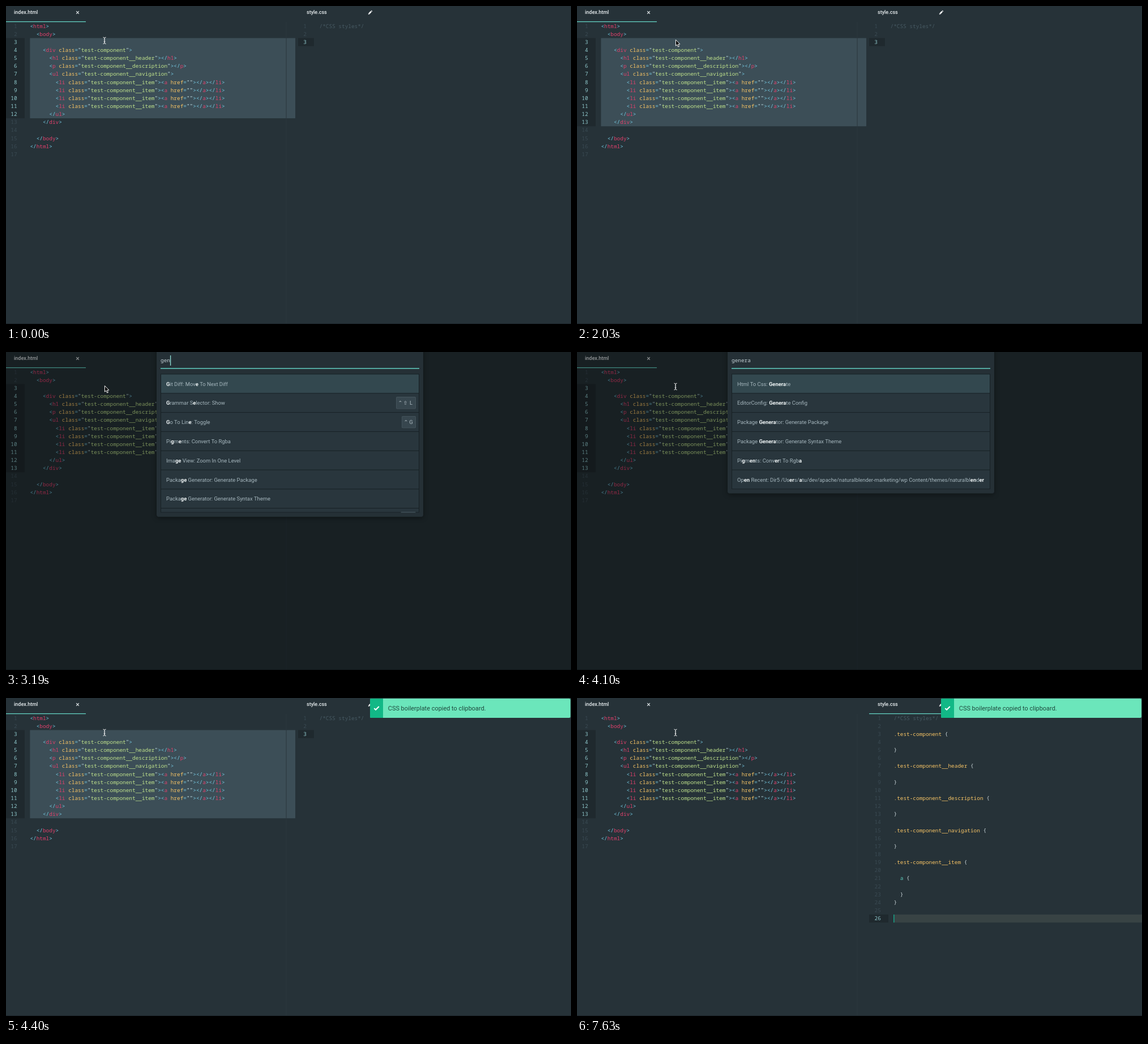
Write an HTML page with a canvas that moves like this. It is 998 px wide and 561 px high and loops after 8 s.

```html
<!DOCTYPE html>
<html lang="en">
<head>
<meta charset="utf-8">
<title>Editor command palette</title>
<style>
html, body { margin: 0; width: 100%; height: 100%; overflow: hidden; background: #263238; }
canvas { display: block; }
</style>
</head>
<body>
<canvas id="stage" width="998" height="561"></canvas>
<script>
const ctx = document.getElementById('stage').getContext('2d');
const LOOP = 8000, TOP = 28.3, LINE = 14.147, ROW = 33.8;
const MONO = '9.41px "Noto Sans Mono", monospace';
const UI = '9.41px Roboto, sans-serif';
const SYMBOL = '9.41px Roboto, "DejaVu Sans", sans-serif';
const C = {
  bg: '#263238', gutter: '#1f292e', select: '#3c4e57', guide: '#2a373d', dim: '#3a4a53', live: '#8fc7cb',
  punct: '#76c9e2', tag: '#e0416c', attr: '#f7c465', str: '#c0e38c', quote: '#c3e2e8',
  comment: '#475a63', brace: '#c9d4d8', elem: '#5fd0c0', accent: '#62cfc0', caret: '#14a085'
};

const item = '      <li class="test-component__item"><a href=""></a></li>';
const html = [
  '<html>', '  <body>', '', '  <div class="test-component">'.padStart(32),
  '      <h1 class="test-component__header"></h1>',
  '      <p class="test-component__description"></p>',
  '      <ul class="test-component__navigation">',
  ...Array(4).fill('  ' + item),
  '      </ul>', '    </div>', '', '  </body>', '</html>', ''
];
const block = name => ['.test-component' + name + ' {', '', '}', ''];
const cssBefore = ['/*CSS styles*/', '', ''];
const cssAfter = [
  '/*CSS styles*/', '', ...['', '__header', '__description', '__navigation'].flatMap(block),
  '.test-component__item {', '', '  a {', '', '  }', '}', '', ''
];

const startList = [
  'About: View Release Notes', 'Activate Power Mode: Toggle|⌃⌥O', 'Application: About',
  'Application: Add Project Folder|⇧⌘O', 'Application: Bring All Windows To Front',
  'Application: Hide|⌘H', 'Application: Hide Other Applications|⌥⌘H', ''
];
// Asterisks force the emphasised runs.
const commands = [
  'Html To Css: Generate', 'EditorConfig: Generate Config',
  'Package Generator: Generate Package', 'Package Generator: Generate Syntax Theme',
  'Pigments: Convert To Rgba',
  'Op*en* Recent: Dir5 /Us*er*s/*a*tu/dev/apache/naturalblender-marketing/wp Content/themes/naturalbl*en*d*er*',
  'Git Diff: Move To Next Diff', 'Image View: Zoom In One Level', 'Settings View: Open|⌘,',
  'Grammar Selector: Show|⌃⇧L', 'Go To Line: Toggle|⌃G'
];
const QUERY = 'genera';
const typeTimes = [2890, 3040, 3190, 3360, 3510, 3660];
const listTimes = [3040, 3190, 3360, 3510, 3660, 3810];
const passed = (times, t) => times.filter(v => t >= v).length;

function rect(x, y, x2, y2, color) {
  ctx.fillStyle = color;
  ctx.fillRect(x, y, x2 - x, y2 - y);
}

function box(x, y, x2, y2, r, color) {
  ctx.beginPath();
  ctx.roundRect(x, y, x2 - x, y2 - y, r);
  ctx.fillStyle = color;
  ctx.fill();
}

function text(s, x, y, color, font, align = 'left') {
  ctx.font = font;
  ctx.fillStyle = color;
  ctx.textAlign = align;
  ctx.fillText(s, x, y);
  return ctx.measureText(s).width;
}

function path(points, color, width, fill) {
  ctx.beginPath();
  for (const [x, y] of points) ctx.lineTo(x, y);
  if (fill) {
    ctx.closePath();
    ctx.fillStyle = fill;
    ctx.fill();
  }
  ctx.strokeStyle = color;
  ctx.lineWidth = width;
  ctx.stroke();
}

const lineTop = n => TOP + LINE * (n - 1);

function htmlTokens(line) {
  let last = '';
  return line.match(/"[^"]*"|<\/?|[\w-]+|\s+|./g)?.flatMap(s => {
    const prev = last;
    last = s;
    if (s[0] === '"') return [['"', C.quote], [s.slice(1, -1), C.str], ['"', C.quote]];
    if (/\w/.test(s)) return [[s, prev[0] === '<' ? C.tag : C.attr]];
    return [[s, C.punct]];
  }) || [];
}

function cssTokens(line) {
  if (line.startsWith('/*')) return [[line, C.comment]];
  return (line.match(/[.\w-]+|\s+|./g) || []).map(s =>
    [s, s[0] === '.' ? C.attr : /\w/.test(s) ? C.elem : C.brace]);
}

function drawCode(lines, tokens, x, numX, from, to) {
  lines.forEach((line, i) => {
    const y = lineTop(i + 1) + 10.2, live = i + 1 >= from && i + 1 <= to;
    text(i + 1, numX, y, live ? C.live : C.dim, MONO, 'right');
    let at = x;
    for (const [s, color] of tokens(line)) at += text(s, at, y, color, MONO);
  });
}

function drawEditor(t) {
  const last = t < 450 ? 12 : 13, bottom = lineTop(last + 1);
  const selected = t < 2360 || (t >= 4250 && t < 5990);
  const focus = t >= 5990, pasted = t >= 6730;

  rect(0, 0, 998, 561, C.bg);
  rect(0, lineTop(3), 33, bottom, C.gutter);
  if (selected) rect(42.4, lineTop(3), 511, bottom, C.select);
  rect(494.5, 28, 495.5, 560, C.guide);

  const css = pasted ? cssAfter : cssBefore, n = css.length, shift = pasted ? 6 : 0;
  rect(516, lineTop(n), 544 + shift, lineTop(n + 1), C.gutter);
  if (focus) rect(553 + shift, lineTop(n), 998, lineTop(n + 1), '#384344');
  const caret = (focus && t < 6280) || (pasted && t < 7330) || t >= 7630;
  if (caret) rect(553 + shift, lineTop(n), 554.5 + shift, lineTop(n + 1), C.caret);

  drawCode(html, htmlTokens, 42.4, 19.6, 3, last);
  drawCode(css, cssTokens, 553.5 + shift, 530.8 + shift, n, n);

  const tabFont = '500 9px Roboto, sans-serif';
  text('index.html', 14, 14.3, '#e8eef0', tabFont);
  text('style.css', 531, 14.3, '#e8eef0', tabFont);
  path([[124.2, 9.2], [128.8, 13.8]], '#e8eef0', 1.2);
  path([[128.8, 9.2], [124.2, 13.8]], '#e8eef0', 1.2);
  path([[641.4, 13.3], [645, 9.7]], '#fff', 2.5);
  path([[645.6, 9.1], [646.4, 8.3]], '#fff', 2.5);
  path([[640, 14.8], [640.4, 12.9], [641.9, 14.4]], '#fff', 0.4, '#fff');

  const fading = focus && t < 6140;
  ctx.globalAlpha = fading ? 0.5 : 1;
  if (!focus || fading) rect(0, 27, 141, 28.3, C.accent);
  if (focus) rect(516, 27, 657, 28.3, C.accent);
  ctx.globalAlpha = 1;
  rect(0, 560, 998, 561, '#1b2429');
}

// Indices of the matched letters, or null when the query does not fit.
function match(raw, q) {
  const s = raw.replace(/\*/g, '').toLowerCase(), run = s.indexOf(q);
  if (run >= 0) return [...q].map((_, i) => run + i);
  const hits = [];
  for (const ch of q) {
    const i = s.indexOf(ch, hits.length ? hits[hits.length - 1] + 1 : 0);
    if (i < 0) return null;
    hits.push(i);
  }
  return hits;
}

function results(q) {
  if (!q) return startList;
  const name = s => s.split('|')[0];
  const list = commands.filter(s => match(name(s), q));
  if (q.length < 3) list.sort((a, b) => match(name(a), q)[0] - match(name(b), q)[0]);
  return list.slice(0, 8);
}

function emphasise(raw, q) {
  if (!q || raw.includes('*')) return raw;
  const hits = match(raw, q);
  return [...raw].map((ch, i) => hits.includes(i) ? `*${ch}*` : ch).join('').replace(/\*\*/g, '');
}

function drawKeys(keys, mid) {
  const cells = [...keys], size = ch => ch === '⌃' ? 8 : 10;
  let x = 717 - cells.reduce((sum, ch) => sum + size(ch), 0);
  box(x, mid - 10.7, 724, mid + 10.7, 2, '#46555d');
  box(x + 0.8, mid - 9.9, 723.2, mid + 9.9, 1.5, '#37464e');
  x += 3.5;
  for (const ch of cells) {
    text(ch, x + size(ch) / 2, mid + 3.4, '#b0bec5', SYMBOL, 'center');
    x += size(ch);
  }
}

function drawPalette(t) {
  const typed = passed(typeTimes, t), q = QUERY.slice(0, passed(listTimes, t));
  const rows = results(q), end = 39 + Math.min(rows.length * ROW, 244);

  rect(0, 0, 998, 561, 'rgba(0,0,0,.37)');
  ctx.save();
  ctx.shadowColor = 'rgba(0,0,0,.4)';
  ctx.shadowBlur = 8;
  ctx.shadowOffsetY = 2;
  box(266, -10, 737, end + 7.8, 4, '#253036');
  ctx.restore();

  text(QUERY.slice(0, typed), 273, 18.2, '#c3d0d5', MONO);
  const blank = (t >= 2740 && t < 2890) || t >= 4100;
  if (!blank) rect(273 + typed * 5.646, 6, 274.3 + typed * 5.646, 24, '#8fe0d6');
  const half = t < 2510 ? 132 : t < 2740 ? 227.5 : 228.5;
  rect(501.5 - half, 28.3, 501.5 + half, 29.8, C.accent);

  ctx.save();
  ctx.beginPath();
  ctx.rect(273, 38.5, 457, end - 38.2);
  ctx.clip();
  rect(273, 38, 730, end + 1, '#172024');
  rows.forEach((row, i) => {
    const y = 39 + i * ROW, mid = y + 17.2, [label, keys] = row.split('|');
    rect(274, y + 0.5, 729, Math.min(y + ROW - 0.5, end - 0.6), i ? '#29363d' : '#33484f');
    let x = 283;
    emphasise(label, q).split('*').forEach((part, k) => {
      x += text(part, x, mid + 3.4, k % 2 ? '#eef4f5' : '#a6b7be', (k % 2 ? '700 ' : '') + UI);
    });
    if (keys) drawKeys(keys, mid - 0.2);
  });
  ctx.restore();
}

function drawToast() {
  box(643, 1, 997, 35, 2, '#6be6bb');
  box(643, 1, 666, 35, [2, 0, 0, 2], '#12b886');
  path([[650.3, 18.2], [653, 20.8], [658.8, 15]], '#fff', 2);
  text('CSS boilerplate copied to clipboard.', 674.8, 21.9, '#1f4a3e', '10.95px Roboto, sans-serif');
}

function drawPointer(arrow) {
  if (arrow) {
    path([[174.4, 59.6], [174.4, 70.2], [176.8, 68], [178.6, 72], [180.4, 71.2],
      [178.7, 67.4], [181.8, 67.2], [174.4, 59.6]], '#fff', 1, '#000');
    return;
  }
  path([[171.5, 55.2], [173.2, 55.6], [174, 56.6], [174.8, 55.6], [176.5, 55.2]], '#fff', 1);
  path([[174, 56.4], [174, 65.6]], '#fff', 1.2);
  path([[171.5, 66.8], [173.2, 66.4], [174, 65.4], [174.8, 66.4], [176.5, 66.8]], '#fff', 1);
  path([[172.7, 63], [175.3, 63]], '#fff', 0.8);
}

function frame() {
  const t = performance.now() % LOOP;
  drawEditor(t);
  if (t >= 2360 && t < 4250) drawPalette(t);
  if (t >= 4400) drawToast();
  drawPointer(t >= 2030 && t < 4100);
  requestAnimationFrame(frame);
}
frame();
</script>
</body>
</html>
```
